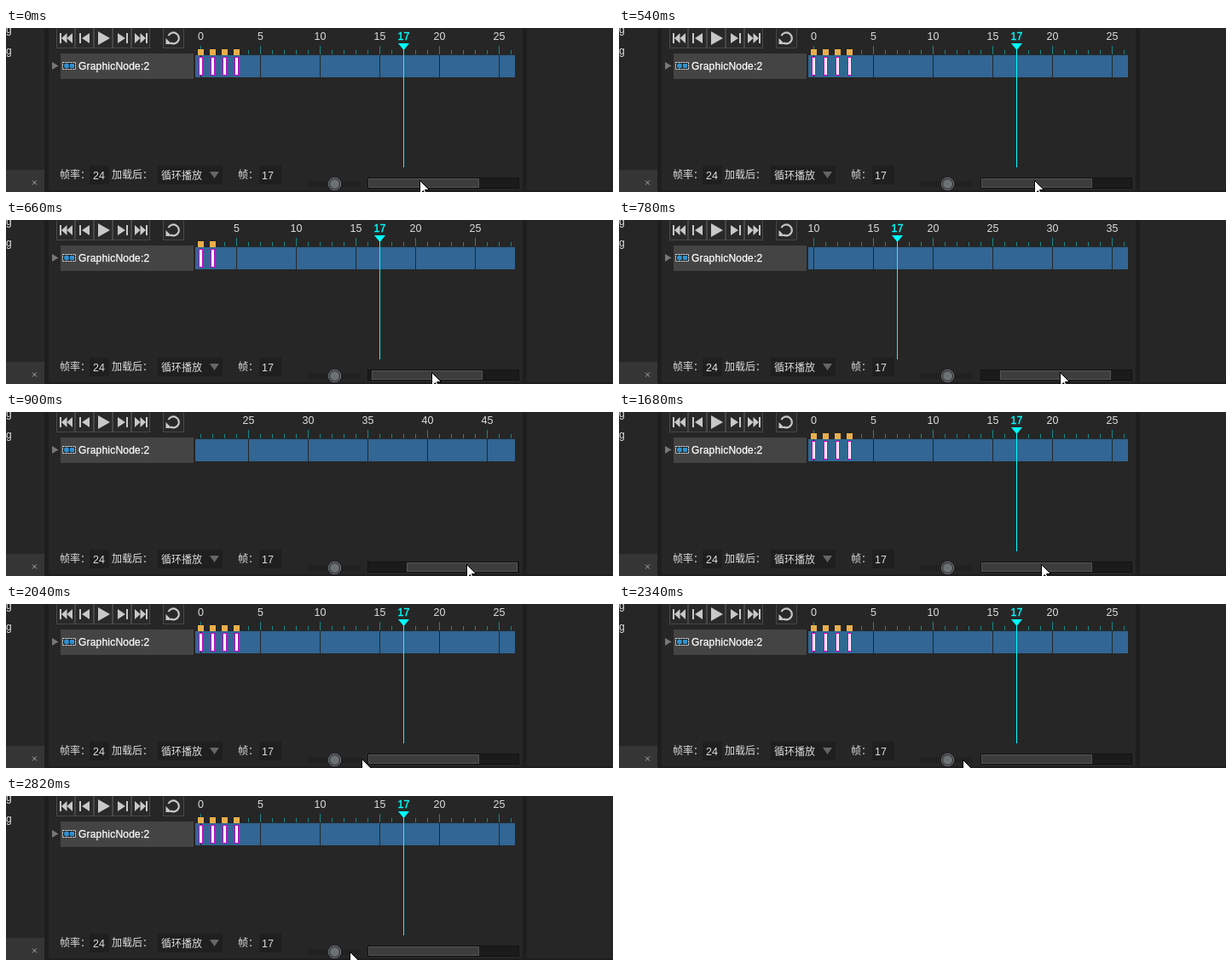
Animation, 712 px wide and 193 px high, one loop 3540 ms. Source, as an HTML page:

```html
<!DOCTYPE html>
<html lang="zh">
<head>
<meta charset="utf-8">
<title>Timeline scrolling</title>
<style>
html, body { margin: 0; width: 100%; height: 100%; overflow: hidden; background: #262626; }
svg { display: block; }
text { font: 12px "Liberation Sans", Arial, sans-serif; fill: #ddd; white-space: pre; }
.num { font-size: 12.5px; text-anchor: middle; }
.cjk { font: 12px "Noto Sans CJK SC", "Noto Sans CJK", sans-serif; }
.name { fill: #fff; letter-spacing: .2px; stroke: #fff; stroke-width: .25; }
.now { fill: #0ff; stroke: #0ff; stroke-width: .4; }
.button { fill: #292929; stroke: #484848; }
.icon { fill: #c8c8c8; }
.field { fill: #1f1f1f; }
.separator { fill: #1e1e1e; }
</style>
</head>
<body>
<svg width="712" height="193" viewBox="0 0 712 193">
  <defs>
    <clipPath id="view"><rect x="222" width="375" height="193"/></clipPath>
    <path id="skip" d="M-7 6h2v12h-2zM1.500 6v12l-6.500-6zM8 6v12l-6.500-6z"/>
    <path id="step" d="M-6 6h2v12h-2zM6 6v12l-9-6z"/>
  </defs>
  <rect width="712" height="193" fill="#262626"/>

  <g class="separator">
    <rect x="45" width="5" height="193"/>
    <rect x="606" width="5" height="193"/>
    <rect x="45" y="191" width="667" height="2"/>
  </g>
  <rect y="167" width="45" height="26" fill="#353535"/>
  <path d="M31 179.500l5 5m0-5l-5 5" stroke="#aaa"/>
  <text x="0" y="6">g</text>
  <text x="0" y="31">g</text>

  <g id="buttons"></g>
  <rect class="button" x="184.500" y="-1.500" width="24" height="25"/>
  <g class="icon">
    <use href="#skip" x="70"/>
    <use href="#step" x="92"/>
    <path d="M108 4v16l14-8z"/>
    <use href="#step" transform="translate(137) scale(-1 1)"/>
    <use href="#skip" transform="translate(159) scale(-1 1)"/>
    <path d="M187.500 12v7h7z"/>
  </g>
  <path d="M190.500 9A6.500 6.500 0 1 1 193 17.500" fill="none" stroke="#c8c8c8" stroke-width="2.200"/>

  <path d="M54 40v9l7.500-4.500z" fill="#777"/>
  <rect x="64" y="30" width="156" height="30" fill="#444"/>
  <rect x="66.500" y="40.500" width="15" height="8" fill="#222" stroke="#eee" stroke-dasharray="2 1"/>
  <g fill="#2f91cf"><circle cx="71" cy="44.500" r="3"/><rect x="75" y="42" width="5" height="5"/></g>
  <text class="name" x="85" y="49">GraphicNode:2</text>

  <rect x="222" y="32" width="375" height="26" fill="#326694"/>
  <g clip-path="url(#view)"><g id="frames"></g></g>

  <g class="field">
    <rect x="98" y="162" width="23" height="22"/>
    <rect x="178" y="162" width="76" height="22"/>
    <rect x="297" y="162" width="26" height="22"/>
  </g>
  <text class="cjk" x="63" y="177">帧率：</text>
  <text class="num" x="109" y="178">24</text>
  <text class="cjk" x="124" y="177">加载后：</text>
  <text class="cjk" x="182" y="178">循环播放</text>
  <path d="M239 169h11l-5.500 8z" fill="#666"/>
  <text class="cjk" x="272" y="177">帧：</text>
  <text class="num" x="307" y="178">17</text>

  <rect x="354" y="180" width="62" height="7" fill="#212121"/>
  <circle cx="385.500" cy="183.500" r="7" fill="#222" stroke="#868b8e"/>
  <circle cx="385.500" cy="183.500" r="5.500" fill="#6c7174"/>
  <rect x="424.500" y="176.500" width="177" height="12" fill="#1b1b1b" stroke="#111"/>
  <rect id="thumb" x="425.500" y="177.500" width="129" height="10" fill="#3d3d3d" stroke="#545454"/>
  <path id="cursor" d="M.5 .5V16.500L4.500 12.500L7 18.500L9 17.500L6.500 11.500H11.500Z" fill="#fff" stroke="#000"/>
</svg>
<script>
const LOOP = 3540, TICK = 60;
const PITCH = 14, ORIGIN = 228;
const GRAB = 496, RANGE = 45, LAST = 21;
const START_X = 486;

const moves = [
  { from: 480, to: 900, x: 541, power: 1.6 },
  { from: 1020, to: 1260, x: 585, power: 1 },
  { from: 1380, to: 1560, x: 519, power: 1.5 },
  { from: 1560, to: 2040, x: 418, power: 1.06 },
  { from: 2160, to: 2340, x: 404, power: 1 }
];

const byId = id => document.getElementById(id);
const clamp = (v, lo, hi) => Math.min(hi, Math.max(lo, v));
const shift = (id, x, y = 0) => byId(id).setAttribute("transform", `translate(${x} ${y})`);
const rect = (x, y, w, h, fill) =>
  `<rect x="${x}" y="${y}" width="${w}" height="${h}" fill="${fill}"/>`;
const label = (x, text, type = "") =>
  `<text class="num ${type}" x="${x + 0.5}" y="14">${text}</text>`;

function frameMark(i) {
  const x = ORIGIN + i * PITCH, major = i % 5 === 0;
  let out = rect(x, major ? 21 : 26, 1, major ? 10 : 5, "#168888");
  if (major) out += label(x, i) + rect(x, 32, 1, 26, "#262626");
  if (i < 4) {
    out += rect(x - 3, 25, 7, 7, "#e9ae4b") + rect(x - 2, 34, 5, 22, "#c800c8") +
      rect(x - 1, 35, 3, 20, "#fff");
  }
  return out;
}

function playhead(i) {
  const x = ORIGIN + i * PITCH;
  return label(x, i, "now") + rect(x, 20, 1, 144, "#0ff") +
    `<path d="M${x - 6} 18h13l-6.500 8z" fill="#0ff"/>`;
}

const repeat = (n, make) => Array.from({ length: n }, (_, i) => make(i)).join("");
byId("buttons").innerHTML = repeat(5, i =>
  `<rect class="button" x="${59.5 + i * 22}" y="-1.5" width="21" height="25"/>`);
byId("frames").innerHTML = repeat(50, frameMark) + playhead(17);

function cursorX(t) {
  let x = START_X;
  for (const move of moves) {
    const p = clamp((t - move.from) / (move.to - move.from), 0, 1);
    x += (move.x - x) * p ** move.power;
  }
  return Math.round(x);
}

const start = performance.now();
function draw() {
  const elapsed = (performance.now() - start) % LOOP;
  const t = Math.floor(elapsed / TICK) * TICK;
  const x = cursorX(t);
  const y = 180 + Math.max(0, Math.round((GRAB - x) / 24));
  // The thumb rests at its end until the drag back begins.
  const resting = t >= 900 && t < 1620;
  const offset = resting ? RANGE : clamp(x - GRAB, 0, RANGE);
  shift("cursor", x - 1, y - 1);
  shift("thumb", offset);
  shift("frames", -Math.round(offset / RANGE * LAST) * PITCH);
  requestAnimationFrame(draw);
}
draw();
</script>
</body>
</html>
```
